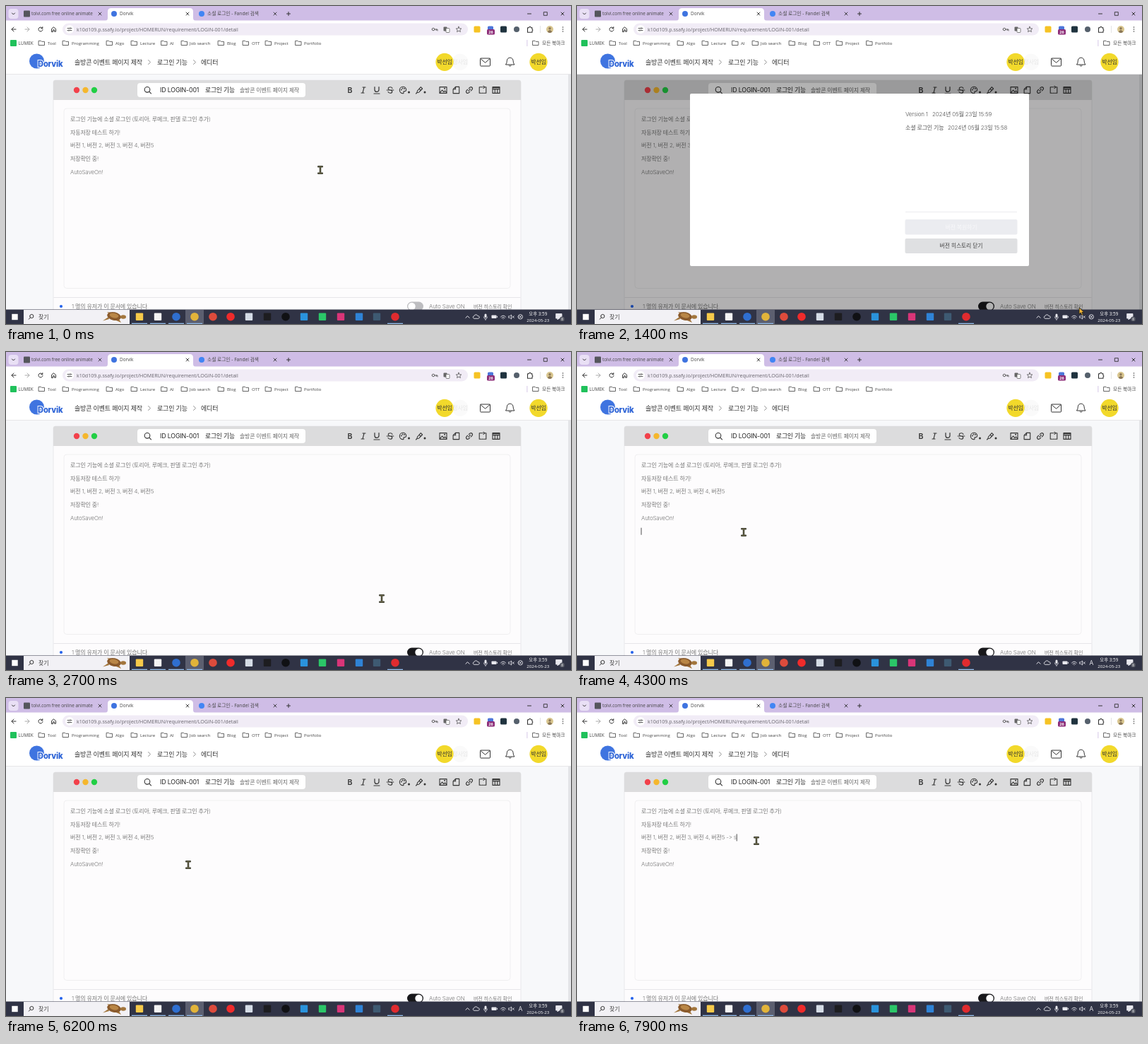
Recreate the animation shown at these times as an HTML page. Size 800 px wide and 450 px high, loop 8000 ms.

```html
<!DOCTYPE html>
<html lang="ko">
<head>
<meta charset="utf-8">
<title>Editor</title>
<style>
html, body { margin: 0; width: 100%; height: 100%; overflow: hidden; background: #fff; }
svg { display: block; width: 800px; height: 450px; }
text { white-space: pre; }
</style>
</head>
<body>
<svg id="stage" viewBox="0 0 800 450" xmlns="http://www.w3.org/2000/svg"></svg>
<script>
const UI = "'Open Sans','Noto Sans CJK KR',sans-serif";
const APP = "Inter,'Noto Sans CJK KR',sans-serif";
const LOOP = 8000, STEP = 100;

// y is the middle of the line
const text = (x, y, s, size, o = {}) =>
  `<text x="${x}" y="${(y + size * 0.36).toFixed(2)}" font-size="${size}" font-family="${o.font || APP}"` +
  ` font-weight="${o.w || 300}" fill="${o.fill || '#777'}" letter-spacing="${o.ls ?? -0.17}"` +
  ` text-anchor="${o.at || 'start'}" ${o.more || ''}>${s}</text>`;
const ui = (x, y, s, size, o = {}) => text(x, y, s, size, { font: UI, w: 400, fill: '#444', ls: 0, ...o });
const rect = (x, y, w, h, fill, r = 0, more = '') =>
  `<rect x="${x}" y="${y}" width="${w}" height="${h}" rx="${r}" fill="${fill}" ${more}/>`;
const dot = (x, y, r, fill) => `<circle cx="${x}" cy="${y}" r="${r}" fill="${fill}"/>`;
const line = (d, color = '#333', w = 1, fill = 'none') =>
  `<path d="${d}" fill="${fill}" stroke="${color}" stroke-width="${w}" stroke-linecap="round" stroke-linejoin="round"/>`;
const icon = (x, y, d, color, w, fill) => `<g transform="translate(${x} ${y})">${line(d, color, w, fill)}</g>`;
const ring = r => `M${-r} 0a${r} ${r} 0 1 0 ${2 * r} 0a${r} ${r} 0 1 0 ${-2 * r} 0`;
const CROSS = 'M-2 -2L2 2M2 -2L-2 2';
const FOLDER = 'M-4 -3h3l1 1h4v5.2h-8z';

function tabs() {
  return rect(0, 0, 800, 24, '#cfbde6') +
    rect(3.5, 4, 14, 14, '#e9e0f5', 4) + icon(10.5, 11, 'M-2 -1L0 1L2 -1') +
    rect(25, 6.5, 9, 9, '#55565c', 1) +
    ui(36, 11, 'tolvi.com free online animate', 6.4) + icon(133, 11, CROSS, '#333', .9) +
    `<path d="M140 21q4 0 4-4V8q0-5 5-5h111q5 0 5 5v9q0 4 4 4z" fill="#fff"/>` +
    dot(153, 11, 4, '#3f74e0') + ui(161, 11, 'Dorvik', 6.4) + icon(257, 11, CROSS, '#333', .9) +
    dot(277, 11, 4, '#4285f4') + ui(285, 11, '소셜 로그인 - Fandel 검색', 6.7) +
    icon(381, 11, CROSS, '#333', .9) + icon(400, 11, 'M-2.5 0H2.5M0 -2.5V2.5') +
    icon(741, 11, 'M-2.5 0H2.5') + icon(764, 11, 'M-2.3 -2.3h4.6v4.6h-4.6z', '#333', .9) + icon(788, 11, CROSS);
}

function addressBar() {
  return rect(0, 20.5, 800, 76, '#fff') +
    icon(11, 33, 'M3 0H-3M0 -3L-3 0L0 3') + icon(30, 33, 'M-3 0H3M0 -3L3 0L0 3', '#aaa') +
    icon(49, 33, 'M2.6 -1.6A3 3 0 1 0 3 .6M2.8 -3.4V-1.2H.6') +
    icon(67.5, 33, 'M-3 3.2V-.6L0 -3.2L3 -.6V3.2H1V.8H-1V3.2z') +
    rect(80, 24.5, 574, 17, '#f1ecf6', 8.5) + dot(90, 33, 6, '#fff') +
    icon(90, 33, 'M-3 -1.5H0M2 -1.5H3M-3 1.5H-2M0 1.5H3M1 -2.4V-.6M-1 .6V2.4', '#444', .9) +
    ui(100, 33, 'k10d109.p.ssafy.io/project/HOMERUN/requirement/LOGIN-001/detail', 7.1, { fill: '#66636c' }) +
    icon(605, 33, ring(1.8) + 'M1.8 0H6V2M4.2 0V1.5', '#555', .9) +
    rect(619.5, 29.5, 5, 6, '#666', 1) + rect(623, 31.5, 5, 6, '#fff', 1, 'stroke="#666" stroke-width=".8"') +
    icon(641, 33, 'M0 -3.8L1.1 -1.2L3.8 -1L1.8 .8L2.4 3.6L0 2.1L-2.4 3.6L-1.8 .8L-3.8 -1L-1.1 -1.2z', '#555', .8) +
    rect(662.5, 28.5, 9, 9, '#f6c324', 1.5) +
    rect(682, 28.5, 8, 8, '#4d76d9', 1.5) + rect(681, 33, 11, 7.5, '#8d2d78', 1.5) +
    ui(686.5, 36.8, '26', 5.5, { fill: '#fff', at: 'middle', w: 700 }) +
    rect(700, 28.5, 9, 9, '#20333f', 1.5) + dot(723, 33, 4, '#55606c') +
    icon(742, 33, 'M-3.5 -2.3h2a1.4 1.4 0 0 1 2.8 0h1.7v2.2a1.3 1.3 0 0 1 0 2.4v2h-6.5z', '#333', 1.1) +
    rect(756, 28, .8, 10, '#ddd') + dot(770, 33, 5, '#d8c58e') + dot(770, 31.8, 1.7, '#8a7656') +
    `<path d="M766.7 36.5q3.3-5 6.6 0q-3.3 3-6.6 0z" fill="#8a7656"/>` +
    [-3, 0, 3].map(d => dot(788.5, 33 + d, .8, '#444')).join('');
}

function bookmarks() {
  const items = [['Tool', 50.5, 59], ['Programming', 84.5, 93], ['Algo', 146.5, 155], ['Lecture', 181.5, 190],
    ['AI', 224, 232], ['Job search', 252.5, 260], ['Blog', 304.5, 313], ['OTT', 339.5, 348],
    ['Project', 371.5, 380], ['Portfolio', 414, 422]];
  return rect(6, 48, 9, 9, '#20c15b', 1) + ui(17.5, 52.3, 'LUMEK', 6.4) +
    items.map(([s, fx, x]) => icon(fx, 52.3, FOLDER, '#555', .9) + ui(x, 52.3, s, 6.1)).join('') +
    rect(737.5, 48, .8, 9, '#cbb9e2') + icon(750, 52.3, FOLDER, '#555', .9) + ui(759, 52.3, '모든 북마크', 6.7);
}

function header() {
  const crumb = { w: 400, fill: '#333', ls: -0.2 };
  const user = x => dot(x, 79.3, 12.6, '#f2d92b') +
    text(x, 79.3, '박선임', 8, { w: 400, fill: '#333', at: 'middle' });
  return dot(43.5, 78, 10.5, '#3f74e0') +
    text(45, 82, 'Dorvik', 11.2, { w: 800, fill: '#2b62d6', ls: -0.2,
      more: 'stroke="#fff" stroke-width="2" paint-order="stroke"' }) +
    text(97, 79.5, '솔방콘 이벤트 페이지 제작', 9, crumb) + icon(203, 79.5, 'M-1.5 -3L1.5 0L-1.5 3', '#777', .8) +
    text(214, 79.5, '로그인 기능', 9, crumb) + icon(267, 79.5, 'M-1.5 -3L1.5 0L-1.5 3', '#777', .8) +
    text(276, 79.5, '에디터', 9, crumb) +
    dot(643, 79.3, 11.5, '#fafafa') + text(643, 79.3, '정사임', 8, { fill: '#e6e6e6', at: 'middle' }) +
    user(621) + user(754) +
    icon(678.5, 79.5, 'M-7 -4.5q0 -1 1 -1h12q1 0 1 1v9q0 1 -1 1h-12q-1 0 -1 -1zM-6.6 -5L0 .8L6.6 -5') +
    icon(713.7, 79, 'M-6 3.7q1.6 -1.7 1.6 -5a4.4 4.6 0 0 1 8.8 0q0 3.3 1.6 5zM-1.6 5.2q1.6 2.4 3.2 0') +
    rect(0, 96, 800, 1, '#e6e6e8');
}

function toolbar() {
  const c = '#333', b = (x, s, more) => text(x, 119, s, 10.5, { fill: c, at: 'middle', w: 600, more });
  return rect(67, 105, 662, 330, '#fdfcfd', 3, 'stroke="#e4e4e7" stroke-width=".8"') +
    `<path d="M67 133V108q0-3 3-3H726q3 0 3 3V133z" fill="#dcdcdd"/>` +
    dot(100, 119, 4.2, '#f2414b') + dot(112.5, 119, 4.2, '#f5b72d') + dot(125, 119, 4.2, '#22cf45') +
    rect(186, 109, 238, 20, '#fff', 4) + icon(200, 118.3, ring(3.8) + 'M2.8 2.8L5.5 5.5', c, 1.1) +
    text(218, 119, 'ID LOGIN-001', 8.8, { w: 400, fill: '#222', ls: -0.14 }) +
    text(282, 119, '로그인 기능', 8.8, { w: 400, fill: '#222', ls: -0.18 }) +
    text(331, 119, '솔방콘 이벤트 페이지 제작', 7.9, { fill: '#666' }) +
    b(487, 'B') + icon(506, 119, 'M-1 -4H3M-3 4H1M1 -4L-1 4', c, 1.1) +
    icon(525, 119, 'M-3 -4.4V-.6a3 3 0 0 0 6 0V-4.4M-4 5H4', c, 1.2) +
    icon(544, 119, 'M3 -2.6Q2 -4.4 0 -4.2Q-3 -4 -2.8 -2Q-2.5 -.6 0 0Q3 .7 2.8 2.4Q2.6 4.2 0 4.2Q-2.4 4.2 -3.1 2.4M-4.8 0H4.8', c, 1.1) +
    icon(562, 119, 'M0 4.7A4.7 4.7 0 1 1 4.7 -.3Q4.6 1.7 2.4 1.6Q.4 1.5 1 3.2Q1.3 4.7 0 4.7z', c, 1.1) +
    dot(559.8, 118.5, .9, c) + dot(561.5, 116.5, .9, c) + dot(564, 117, .9, c) + dot(570.5, 122, 1.5, c) +
    icon(585, 119, 'M-2.5 1L2.3 -4.3L4.6 -2L-.4 3.2L-3 3.5zM-4.5 5L-3 3.5M0 -1.8L2.2 .4', c, 1.1) + dot(593, 122, 1.5, c) +
    icon(619, 119, 'M-5 -4.4h10v8.8h-10zM-4.6 3.6L-1.5 0L1 2.6L2.6 1L4.8 3.4', c, 1.1) + dot(621, 116.8, 1, c) +
    icon(637.5, 119, 'M-1 -4.6H4.2V4.6H-4.4V-1.2zM-1 -4.6V-1.2H-4.4', c, 1.1) +
    icon(656, 119, 'M-1.2 1.2L1.4 -1.4M-.6 -2.4L1.2 -4.1a2.2 2.2 0 0 1 3 3L2.4 .8M.6 2.4L-1.2 4.1a2.2 2.2 0 0 1 -3 -3L-2.4 -.8', c, 1.2) +
    icon(675, 119, 'M-2 -4.2H-4.8V4.2H-2M2 -4.2H4.8V4.2H2M-1.6 -4.2H0M1 -2.6L2.8 -4.2L1 -5.6M-1 4.2H1', c, 1.1) +
    icon(694, 119, 'M-5 -4.4h10v8.8h-10zM-5 -3.4H5M-5 -1.4H5M-1.7 -1.4V4.4M1.7 -1.4V4.4', c, 1.1);
}

const LINES = ['로그인 기능에 소셜 로그인 (토리아, 루메크, 판델 로그인 추가)', '자동저장 테스트 하기!',
  '버전 1, 버전 2, 버전 3, 버전 4, 버전5', '저장확인 중!', 'AutoSaveOn!'];
const lineY = i => 160 + i * 18.75;
const body = (dx, dy, tag) => LINES.map((s, i) =>
  text(91 + dx, lineY(i) + dy, s, 8, { more: tag ? `id="${tag}${i}"` : '' })).join('');

function page() {
  return rect(0, 97, 800, 340, '#f7f8fa') + rect(796, 97, 4, 340, '#e4e5e8') + toolbar() +
    rect(82, 145, 632, 254.5, '#fdfcfd', 4, 'stroke="#ececee" stroke-width=".8"') + body(0, 0, 'line') +
    rect(0, 0, .8, 10, '#222', 0, 'id="caret"') +
    rect(67.5, 412, 661, .8, '#e2e2e5') + dot(78, 425, 2.1, '#2563eb') +
    text(93, 425, '1 명의 유저가 이 문서에 있습니다.', 8) +
    rect(568, 418.5, 23, 13, '#bdbdc0', 6.5, 'id="rail"') +
    '<circle id="knob" cy="425" r="5.2" fill="#fff"/>' +
    text(599, 425, 'Auto Save ON', 8, { ls: -0.12 }) + text(662, 425, '버전 히스토리 확인', 7, { ls: -0.12 });
}

function modal() {
  const ink = { fill: '#555' };
  const row = (y, name, x, date) => text(465, y, name, 8, ink) + text(x, y, date, 8, ink);
  return '<g id="modal">' + rect(0, 97, 800, 333, '#000', 0, 'opacity=".3"') + rect(160, 124, 480, 244, '#fff', 2) +
    `<g id="preview">${body(86, -13)}</g>` +
    row(153.5, 'Version 1', 503, '2024년 05월 23일 15:59') + row(172, '소셜 로그인 기능', 525, '2024년 05월 23일 15:58') +
    rect(465, 291, 158, .8, '#e6e6ea') + rect(464.5, 302, 159, 21.5, '#ebecf0', 2) +
    text(544, 313, '버전 복원하기', 7.9, { fill: '#f8f8fa', at: 'middle' }) +
    rect(464.5, 329, 159, 21, '#dfe0e2', 2, 'id="close"') +
    text(544, 339.5, '버전 히스토리 닫기', 7.9, { at: 'middle', more: 'id="closeText"' }) + '</g>';
}

function taskbar() {
  const w = '#e8e8ee';
  const apps = [['s', 189, '#f6c94a'], ['s', 215, '#f4f4f4'], ['c', 241, '#2f6fd0'], ['c', 267, '#e2b43a'],
    ['c', 293, '#dd4b3c'], ['c', 318, '#f02b2b'], ['s', 344, '#d5dce6'], ['s', 370, '#1d1d20'], ['c', 396, '#101114'],
    ['s', 422, '#2a93dc'], ['s', 448, '#2bc668'], ['s', 474, '#d93578'], ['s', 500, '#2f83d6'], ['s', 525, '#3e5a72'],
    ['c', 551, '#e02b2f']];
  const open = [189, 215, 241, 267, 551];
  return rect(0, 429.5, 800, 21, '#303345') + rect(8.3, 435.8, 8.4, 8.4, '#fff') +
    rect(25, 430, 150, 20, '#f2f1f5') + icon(36.3, 439, ring(2.6) + 'M-1.9 1.9L-4 4.2', '#333', 1) +
    ui(46, 440, '찾기', 8) +
    '<path d="M146 443l-9 2.5 8-5.5zM160 443l3 5-7-3zM150 434l-7-1 5 4z" fill="#a2763d"/>' +
    '<ellipse cx="153" cy="439" rx="10" ry="5.8" fill="#8a5a2c" transform="rotate(12 153 439)"/>' +
    '<ellipse cx="153" cy="438" rx="6.5" ry="3.2" fill="#b98646" transform="rotate(12 153 438)"/>' +
    '<ellipse cx="166" cy="440" rx="4" ry="2.8" fill="#a2763d"/>' +
    rect(254, 430, 26, 20, '#5c5f70') +
    apps.map(([k, x, c]) => k === 'c' ? dot(x, 439.7, 5.8, c) : rect(x - 5.2, 434.5, 10.4, 10.4, c, 1)).join('') +
    open.map(x => rect(x - 11, 448.7, 22, 1.3, '#8fb8e6')).join('') +
    icon(653.5, 440, 'M-2.6 1.3L0 -1.3L2.6 1.3', w) +
    icon(666, 440, 'M-3.5 2.2a1.8 1.8 0 0 1 .4 -3.5a2.6 2.6 0 0 1 5 0a1.8 1.8 0 0 1 1.2 3.5z', w, .9) +
    rect(677.5, 435.5, 3, 5.5, w, 1.5) + icon(679, 440, 'M-2.5 0Q-2 3 0 3Q2 3 2.5 0M0 3V4.5', w, .8) +
    rect(687.5, 437.5, 7, 4.6, w, .8) + rect(695, 438.8, 1, 2, w) +
    icon(704, 442.5, 'M-3.5 -2.5Q0 -6.5 3.5 -2.5M-2 -1Q0 -3.3 2 -1M0 .4V.5', w, .9) +
    icon(715, 440, 'M-3 -1.2h1.5L.5 -3V3L-1.5 1.2H-3zM2 -1.3L4.4 1.3M4.4 -1.3L2 1.3', w, .8) +
    '<g id="imeOff">' + icon(728.3, 439.8, ring(3.2) + 'M-1.3 -1.3L1.3 1.3M1.3 -1.3L-1.3 1.3', w, .9) + '</g>' +
    `<g id="imeOn">${ui(728.3, 440, 'A', 9, { fill: w, at: 'middle' })}</g>` +
    ui(753.3, 435.2, '오후 3:59', 6.4, { fill: '#fff', at: 'middle' }) +
    ui(753.3, 444.3, '2024-05-23', 6.15, { fill: '#fff', at: 'middle' }) +
    icon(783, 439, 'M-4 -3.5h8v6.5h-4l-2 2v-2h-2z', w, .9, w) + dot(787.5, 443, 3.5, '#50535f') +
    ui(787.5, 443, '8', 5.5, { fill: '#fff', at: 'middle' });
}

const beam = 'M-2.8 -4.7H2.8M0 -4.7V4.7M-2.8 4.7H2.8';
const cursors = '<g id="cursor">' +
  `<g id="beam">${line(beam, '#33342c', 2.5)}${line(beam, '#8b8657', .7)}</g>` +
  `<g id="arrow">${line('M0 0V9L2.2 7L3.8 10.4L5.5 9.6L4 6.4H6.8z', '#2b2820', 1, '#f0b436')}</g>` +
  `<g id="hand">${line('M-1 .5Q0 -.8 1 .5V4.2L4.8 5Q6 5.4 5.8 7L5 10.2V12H-.2L-1 10.2L-3.4 7.4Q-3.6 5.8 -2.2 6.2L-1 7.2z', '#2b2820', 1, '#f5d547')}</g></g>`;

const stage = document.getElementById('stage');
stage.innerHTML = tabs() + addressBar() + bookmarks() + header() + page() + modal() + taskbar() + cursors;
const $ = id => document.getElementById(id);
const show = (id, on) => $(id).style.display = on ? '' : 'none';
const set = (id, attrs) => Object.entries(attrs).forEach(([k, v]) => $(id).setAttribute(k, v));

// time, x, y of the pointer
const PATH = [[0, 445, 232], [200, 452, 245], [600, 580, 422], [800, 580, 422], [1100, 711, 427], [1400, 711, 427],
  [1800, 500, 153], [2000, 500, 153], [2400, 531, 349], [2700, 532, 349], [3000, 532, 349], [3800, 236, 255],
  [5400, 236, 255], [5900, 258, 236], [6300, 258, 236], [6700, 254, 202], [8000, 254, 202]];
const KINDS = [[0, 'beam'], [500, 'hand'], [800, 'arrow'], [1000, 'hand'], [1300, 'arrow'], [1700, 'hand'],
  [2100, 'arrow'], [2300, 'hand'], [2700, 'beam']];
const CARET = [[0, -1], [4200, 5], [6800, 2]];
const TYPED = [[0, ''], [7200, ' '], [7400, ' -'], [7600, ' ->'], [7700, ' -> '], [7900, ' -> s']];
const at = (table, t) => table.filter(r => r[0] <= t).pop();

function pointer(t) {
  const i = PATH.findIndex((p, k) => k && t < p[0]);
  const [a, b] = [PATH[i - 1], PATH[i]];
  const u = (t - a[0]) / (b[0] - a[0]), e = u * u * (3 - 2 * u);
  return [a[1] + (b[1] - a[1]) * e, a[2] + (b[2] - a[2]) * e];
}

function draw(t) {
  const [x, y] = pointer(t), kind = at(KINDS, t)[1];
  set('cursor', { transform: `translate(${x.toFixed(1)} ${y.toFixed(1)})` });
  ['beam', 'arrow', 'hand'].forEach(k => show(k, k === kind));

  const on = t >= 700;
  set('rail', { fill: on ? '#18181b' : '#bdbdc0' });
  set('knob', { cx: on ? 584.5 : 574.5 });

  const hover = t >= 2300;
  show('modal', t >= 1300 && t < 2700);
  show('preview', t >= 1900);
  set('close', { fill: hover ? '#262733' : '#dfe0e2' });
  set('closeText', { fill: hover ? '#fff' : '#444' });

  const [since, row] = at(CARET, t), [typedAt, typed] = at(TYPED, t);
  $('line2').textContent = LINES[2] + typed;
  const blink = Math.floor((t - Math.max(since, typedAt)) / 530) % 2 === 0;
  show('caret', row >= 0 && blink);
  if (row >= 0) set('caret', { x: row === 2 ? 91 + $('line2').getComputedTextLength() : 90.6, y: lineY(row) - 5 });
  show('imeOn', t >= 3900);
  show('imeOff', t < 3900);
}

const start = performance.now();
function tick() {
  const t = (performance.now() - start) % LOOP;
  draw(Math.floor(t / STEP) * STEP);
  requestAnimationFrame(tick);
}
tick();
</script>
</body>
</html>
```
